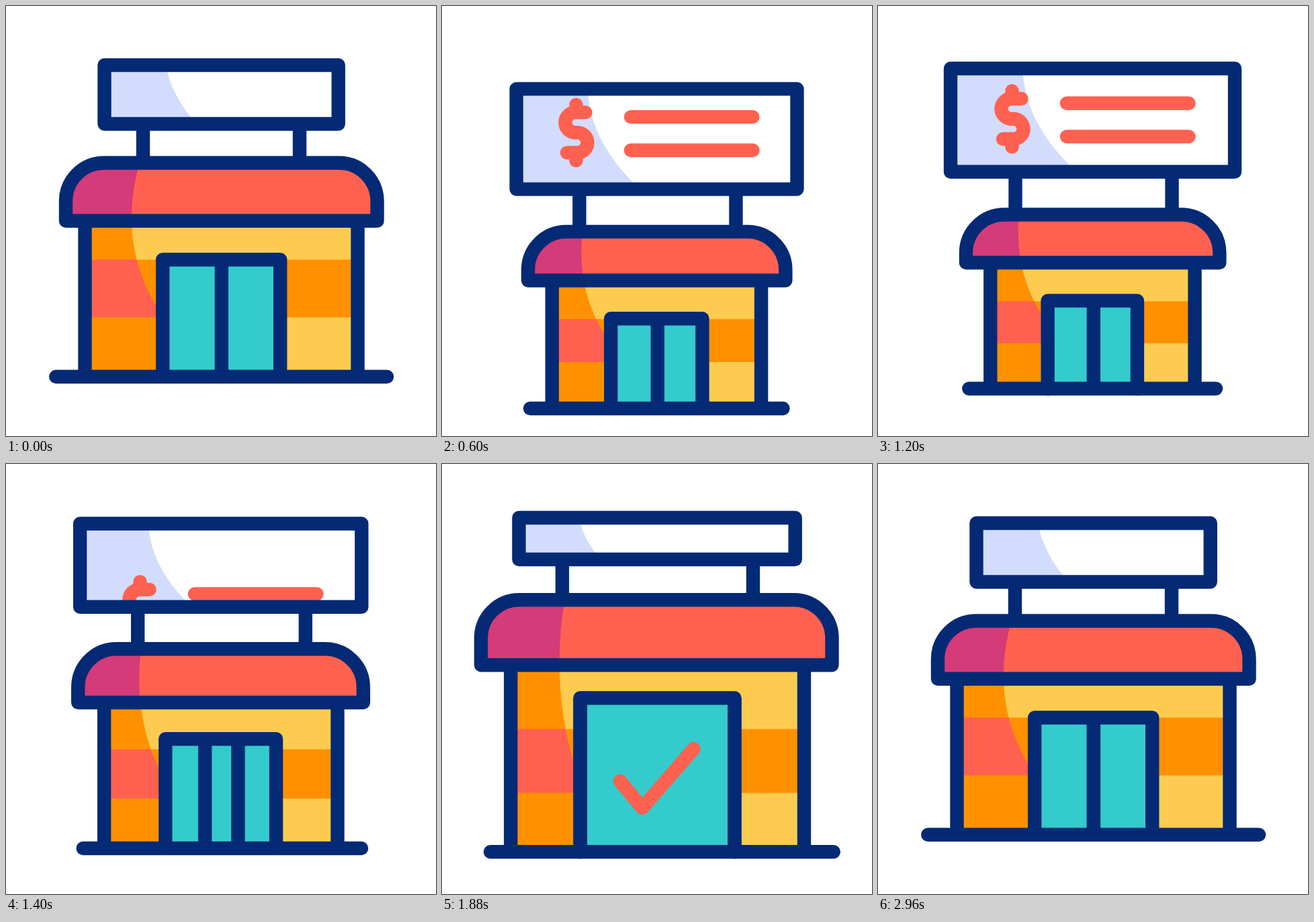
An HTML page for the animation above (3000 ms loop, 640 by 640 pixels).

```html
<!DOCTYPE html>
<html lang="en">
<head>
<meta charset="utf-8">
<title>Store</title>
<style>
html, body { margin: 0; width: 100%; height: 100%; overflow: hidden; background: #fff; }
svg { display: block; width: 100vw; height: 100vh; }
.line { fill: none; stroke: #042a75; stroke-width: 20.4; stroke-linecap: round; stroke-linejoin: round; }
.mark { stroke: #ff6150; }
.butt { stroke-linecap: butt; }
</style>
</head>
<body>
<svg viewBox="0 0 640 640">
  <defs>
    <clipPath id="signClip"><path id="signBox"/></clipPath>
    <clipPath id="roofClip"><path id="roofBox"/></clipPath>
    <clipPath id="gapClip"><path id="gapBox"/></clipPath>
    <clipPath id="wallClip"><path id="wallBox"/></clipPath>
    <clipPath id="shadeClip"><path id="shade"/></clipPath>
  </defs>
  <g id="store">
    <path id="posts" class="line butt"/>
    <path id="signFill" fill="#fff"/>
    <g clip-path="url(#signClip)">
      <path id="signShade" fill="#d2dcfd"/>
      <g id="offer" class="line mark">
        <path d="M199.5 126.5V138M213.5 138H198.5a15 15 0 0 0 0 30H201.5a15 15 0 0 1 0 30H186M199.5 198V209.7"/>
        <path d="M281 144.7H462.5M281 194.3H462.5"/>
      </g>
    </g>
    <path id="sign" class="line"/>
    <g clip-path="url(#wallClip)">
      <path id="light" fill="#fdcb50"/>
      <path id="band" fill="#ff9100"/>
      <g clip-path="url(#shadeClip)">
        <path id="lightDark" fill="#ff9100"/>
        <path id="bandDark" fill="#ff6150"/>
      </g>
    </g>
    <g clip-path="url(#roofClip)">
      <path id="roofFill" fill="#ff6150"/>
      <path id="roofDark" fill="#d53a79" clip-path="url(#shadeClip)"/>
    </g>
    <path id="walls" class="line butt"/>
    <path id="roof" class="line"/>
    <path id="doorFill" fill="#33cbcc"/>
    <g clip-path="url(#gapClip)">
      <path id="check" class="line mark" d="M265 475 298 515 374.5 427"/>
    </g>
    <path id="panels" class="line butt"/>
    <path id="door" class="line"/>
    <path id="ground" class="line"/>
  </g>
</svg>
<script>
const LOOP = 3000;

// Each value: resting store, big sign, open door.
const poses = {
  signL: [146.5, 108, 114.5], signR: [494.7, 531, 525.7], signT: [88, 93, 80], signB: [175.5, 246.8, 142],
  postL: [204, 204.5, 179], postR: [437, 437.5, 463],
  roofL: [89, 131, 58], roofR: [552.5, 508.3, 580.5], roofT: [233.5, 310.5, 202.2], roofB: [319.7, 382, 299.2],
  wallL: [117.5, 167.3, 102.3], wallR: [523.5, 471.5, 539],
  doorL: [233.2, 252.6, 205.5], doorR: [408.2, 385.9, 435.5], doorT: [377.5, 438.7, 348.2],
  bandT: [377.5, 439.5, 394.5], bandB: [463.5, 502, 489.5],
  groundL: [74.3, 135.3, 72], groundR: [567, 503, 582.8], groundY: [551.7, 569.5, 577.3],
  shadeX1: [196, 209, 181], shadeC1: [181, 207, 171], shadeC2: [181, 213, 171.5], shadeX2: [224, 242, 195], shadeY2: [447, 457, 440],
  tintX1: [240, 216, 206], tintC: [249.5, 222, 213], tintX2: [275, 285, 228]
};

const $ = id => document.getElementById(id);
const draw = (id, d) => $(id).setAttribute('d', d);
const box = (l, t, r, b) => `M${l} ${t}H${r}V${b}H${l}Z`;
const clamp = u => Math.min(1, Math.max(0, u));
const mix = (a, b, k) => a + (b - a) * k;

// cubic-bezier(.5, 0, .1, 1)
function ease(u) {
  let lo = 0, hi = 1;
  for (let i = 0; i < 24; i++) {
    const s = (lo + hi) / 2, q = 1 - s;
    if (1.5 * q * q * s + 0.3 * q * s * s + s * s * s < u) lo = s; else hi = s;
  }
  return lo * lo * (3 - 2 * lo);
}
const step = (t, start, length) => ease(clamp((t - start) / length));
const sine = (t, start, end) => (1 - Math.cos(Math.PI * clamp((t - start) / (end - start)))) / 2;

function render(t) {
  const grow = step(t, 100, 763), open = step(t, 1190, 700), close = step(t, 2220, 780);
  const p = {};
  for (const k in poses) {
    const [a, b, c] = poses[k];
    p[k] = mix(mix(mix(a, b, grow), c, open), a, close);
  }
  const dip = 31 * (sine(t, 100, 630) - sine(t, 630, 1200));
  $('store').setAttribute('transform', `translate(0 ${dip})`);

  const sign = box(p.signL, p.signT, p.signR, p.signB);
  ['sign', 'signFill', 'signBox'].forEach(id => draw(id, sign));
  const tintT = p.signT + 10, tintB = p.signB - 10;
  draw('signShade', `M0 0H${p.tintX1}V${tintT}Q${p.tintC} ${mix(tintT, tintB, .53)} ${p.tintX2} ${tintB}V640H0Z`);
  const offerY = -200 * (1 - step(t, 100, 720)) + 150 * open;
  $('offer').setAttribute('transform', `translate(0 ${offerY})`);
  $('offer').style.display = t > 100 && t < 1900 ? '' : 'none';
  draw('posts', `M${p.postL} ${p.signB}V${p.roofT}M${p.postR} ${p.signB}V${p.roofT}`);

  const r = 57;
  const roof = `M${p.roofL} ${p.roofB}V${p.roofT + r}a${r} ${r} 0 0 1 ${r} ${-r}H${p.roofR - r}a${r} ${r} 0 0 1 ${r} ${r}V${p.roofB}Z`;
  ['roof', 'roofFill', 'roofDark', 'roofBox'].forEach(id => draw(id, roof));
  const y1 = p.roofT + 10, y2 = p.shadeY2;
  draw('shade', `M0 0H${p.shadeX1}V${y1}C${p.shadeC1} ${mix(y1, y2, .3)} ${p.shadeC2} ${mix(y1, y2, .65)} ${p.shadeX2} ${y2}V640H0Z`);

  const wall = box(p.wallL, p.roofB, p.wallR, p.groundY);
  ['light', 'lightDark', 'wallBox'].forEach(id => draw(id, wall));
  const band = box(p.wallL, p.bandT, p.wallR, p.bandB);
  ['band', 'bandDark'].forEach(id => draw(id, band));
  draw('walls', `M${p.wallL} ${p.roofB}V${p.groundY}M${p.wallR} ${p.roofB}V${p.groundY}`);

  // Sliding doors trail the building slightly.
  const half = 115 * (step(t, 1215, 700) - step(t, 2246, 754));
  const left = Math.max(p.doorL, 320.8 - half), right = Math.min(p.doorR, 320.8 + half);
  draw('doorFill', box(p.doorL, p.doorT, p.doorR, p.groundY));
  draw('panels', `M${left} ${p.doorT}V${p.groundY}M${right} ${p.doorT}V${p.groundY}`);
  draw('door', `M${p.doorL} ${p.groundY}V${p.doorT}H${p.doorR}V${p.groundY}`);
  draw('gapBox', box(left, p.doorT, Math.max(left, right), p.groundY));
  $('check').setAttribute('transform', `translate(0 ${-300 * (1 - step(t, 1305, 675))})`);

  draw('ground', `M${p.groundL} ${p.groundY}H${p.groundR}`);
}

const begin = performance.now();
function tick() {
  render((performance.now() - begin) % LOOP);
  requestAnimationFrame(tick);
}
tick();
</script>
</body>
</html>
```
